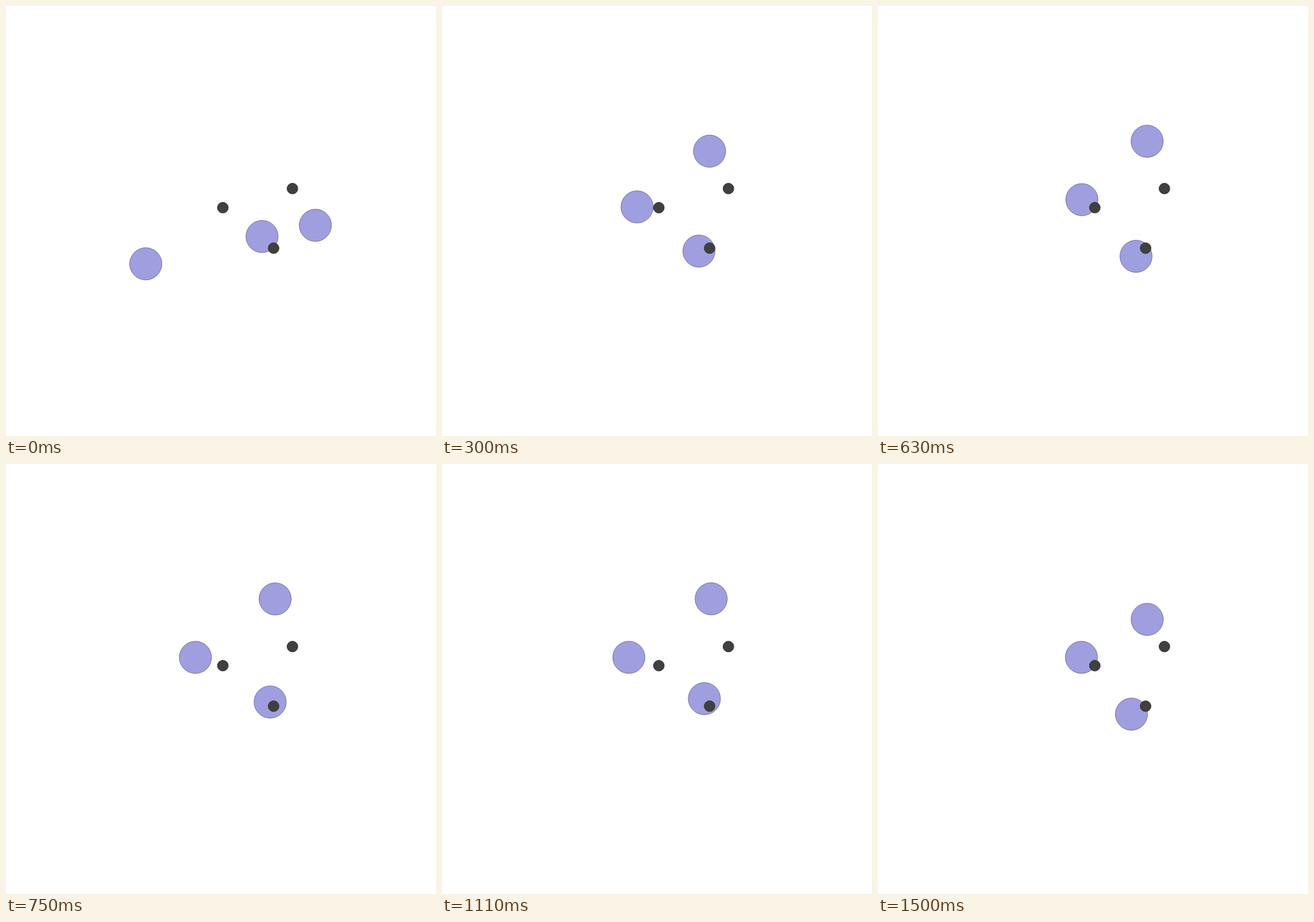
An HTML page without scripts for the animation above (1530 ms loop, 700 by 700 pixels).

```html
<!DOCTYPE html>
<html lang="en">
<head>
<meta charset="utf-8">
<title>Drifting discs</title>
<style>
  @property --step { syntax: "<number>"; inherits: true; initial-value: 0; }
  @property --at { syntax: "<number>"; inherits: false; initial-value: 0; }
  @property --x { syntax: "<number>"; inherits: false; initial-value: 0; }
  @property --y { syntax: "<number>"; inherits: false; initial-value: 0; }

  html, body { margin: 0; width: 100%; height: 100%; overflow: hidden; background: #fff; }

  svg {
    display: block;
    width: 100%;
    height: 100%;
    animation: tick 1530ms steps(51) infinite;
  }
  @keyframes tick { from { --step: 0; } to { --step: 51; } }

  /* A push at step --at glides 35px in total, losing a quarter of its speed per step. */
  g[style] {
    --glide: calc(35px * (1 - pow(0.75, max(0, var(--step) - var(--at)))));
    transform: translate(calc(var(--x) * var(--glide)), calc(var(--y) * var(--glide)));
  }
  .l { --x: -1; }
  .r { --x: 1; }
  .u { --y: -1; }
  .d { --y: 1; }

  .disc { r: 26.25px; fill: rgb(64 64 191 / .5); stroke: rgb(32 32 96 / .5); }
  .dot { r: 8.75px; fill: #404040; stroke: #303030; }
</style>
</head>
<body>
<svg viewBox="0 0 700 700">
  <!-- left disc -->
  <g class="r" style="--at:0"><g class="u" style="--at:1"><g class="u" style="--at:2">
  <g class="r" style="--at:3"><g class="u" style="--at:4"><g class="r" style="--at:5">
  <g class="l" style="--at:21"><g class="r" style="--at:27">
  <g class="l" style="--at:32"><g class="r" style="--at:39">
    <circle class="disc" cx="227.5" cy="419.7" r="26.25"/>
  </g></g></g></g></g></g></g></g></g></g>

  <!-- middle disc; the fractional pushes include its bump with the right disc -->
  <g class="u" style="--at:0"><g class="u" style="--at:1"><g class="u" style="--at:2">
  <g style="--at:3; --x:.771; --y:-.141"><g style="--at:4; --x:-.16; --y:-1.31">
  <g class="d" style="--at:39">
    <circle class="disc" cx="416.8" cy="375.2" r="26.25"/>
  </g></g></g></g></g></g>

  <!-- right disc -->
  <g class="l" style="--at:0"><g class="l" style="--at:1"><g class="l" style="--at:2">
  <g style="--at:3; --x:.229; --y:.141"><g style="--at:4; --x:.16; --y:1.31">
  <g class="r" style="--at:13"><g class="l" style="--at:17">
  <g class="u" style="--at:22"><g class="r" style="--at:23"><g class="l" style="--at:27">
  <g class="r" style="--at:31"><g class="l" style="--at:35"><g class="d" style="--at:36">
    <circle class="disc" cx="503.6" cy="357" r="26.25"/>
  </g></g></g></g></g></g></g></g></g></g></g></g></g>

  <circle class="dot" cx="353" cy="328.3" r="8.75"/>
  <circle class="dot" cx="466.3" cy="297.2" r="8.75"/>
  <circle class="dot" cx="435.6" cy="394.2" r="8.75"/>
</svg>
</body>
</html>
```
